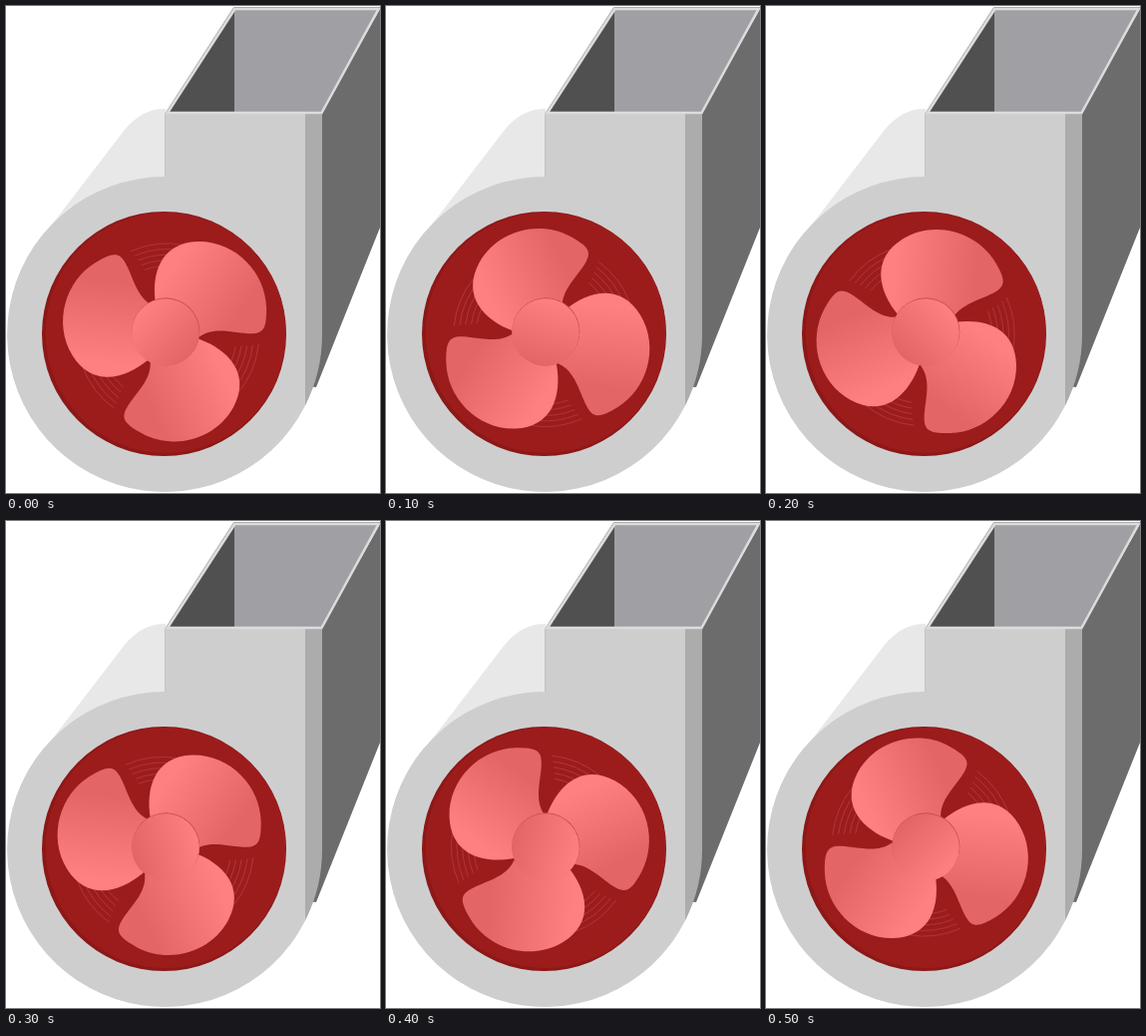
Recreate the animation shown at these times as an HTML page. Size 375 by 488 pixels, loop 600 ms.

```html
<!DOCTYPE html>
<html lang="en">
<head>
<meta charset="utf-8">
<title>Blower fan</title>
<style>
  html, body { margin: 0; width: 100%; height: 100%; overflow: hidden; background: #fff; }
  svg { display: block; width: 375px; height: 488px; }
</style>
</head>
<body>
<svg viewBox="0 0 375 488">
  <defs>
    <linearGradient id="bladeFill" gradientUnits="userSpaceOnUse" x1="5" y1="-68" x2="72" y2="-20">
      <stop stop-color="#ff8080"/>
      <stop offset="1" stop-color="#e46565"/>
    </linearGradient>
    <linearGradient id="hubFill" x1="0.15" y1="0.15" x2="0.85" y2="0.85">
      <stop stop-color="#ff8080"/>
      <stop offset="1" stop-color="#e46565"/>
    </linearGradient>
    <path id="blade" fill="url(#bladeFill)"
      d="M-12-30C-17-60-8-92 30-93.3C68-94 98-62 98.8-27C99-8 97-1 84-1C68-1 47-9 32 2L0 0Z"/>
    <g id="streaks" fill="none" stroke="#b53a3a" stroke-width=".8"></g>
  </defs>

  <!-- housing -->
  <path fill="#e8e8e8" d="M160 103C143 103 131 110 119 124L46 219L160 300Z"/>
  <path fill="#6c6c6c" d="M316 108L375 3V222L311 382L290 380Z"/>
  <path fill="#acacac" d="M290 108H317V329A158 158 0 0 1 300 400.5H290Z"/>
  <path fill="#cecece" d="M159.500 108H300V400.500A158 158 0 1 1 159.500 171Z"/>
  <path stroke="#bdbdbd" stroke-width=".8" d="M159.500 108V171"/>

  <!-- duct opening -->
  <path fill="#9f9fa4" d="M161 107L229 3H374L316.500 107Z"/>
  <path fill="#505050" d="M161 107L229 3V107Z"/>
  <path fill="none" stroke="#999" d="M160 107.500L228.500 1.500H375"/>
  <path fill="none" stroke="#dcdcdc" stroke-width="2.500" d="M162 107L229.500 3H373.500L316.500 107Z"/>

  <!-- intake -->
  <circle cx="158.500" cy="328.500" r="122.500" fill="#8c1717"/>
  <circle cx="160" cy="327.500" r="120.500" fill="#9c1c1c"/>

  <g id="fan">
    <g id="rotor" transform="translate(162.300 329.300)"></g>
  </g>
  <circle cx="160.300" cy="326.300" r="34" fill="#c45050"/>
  <g id="hub"><circle cx="160" cy="327" r="33.800" fill="url(#hubFill)"/></g>
</svg>
<script>
  const $ = id => document.getElementById(id);
  const angles = [0, 60, 90, 120, 150, 180];
  const stepMs = 100;

  const polar = (r, deg) => {
    const a = deg * Math.PI / 180;
    return (r * Math.cos(a)).toFixed(1) + ' ' + (r * Math.sin(a)).toFixed(1);
  };

  let arcs = '';
  for (let i = 0; i < 5; i++) {
    const r = 69 + i * 5.6;
    arcs += `<path d="M${polar(r, 250 - i)}A${r} ${r} 0 0 1 ${polar(r, 276 + i)}"/>`;
  }
  $('streaks').innerHTML = arcs;

  const ring = id => [0, 120, 240].map(a => `<use href="#${id}" transform="rotate(${a})"/>`).join('');
  $('rotor').innerHTML = ring('streaks') + ring('blade');

  function draw(now) {
    const angle = angles[Math.floor(now / stepMs) % angles.length];
    for (const id of ['fan', 'hub']) $(id).setAttribute('transform', `rotate(${angle} 160 327)`);
    requestAnimationFrame(() => draw(performance.now()));
  }
  draw(performance.now());
</script>
</body>
</html>
```
